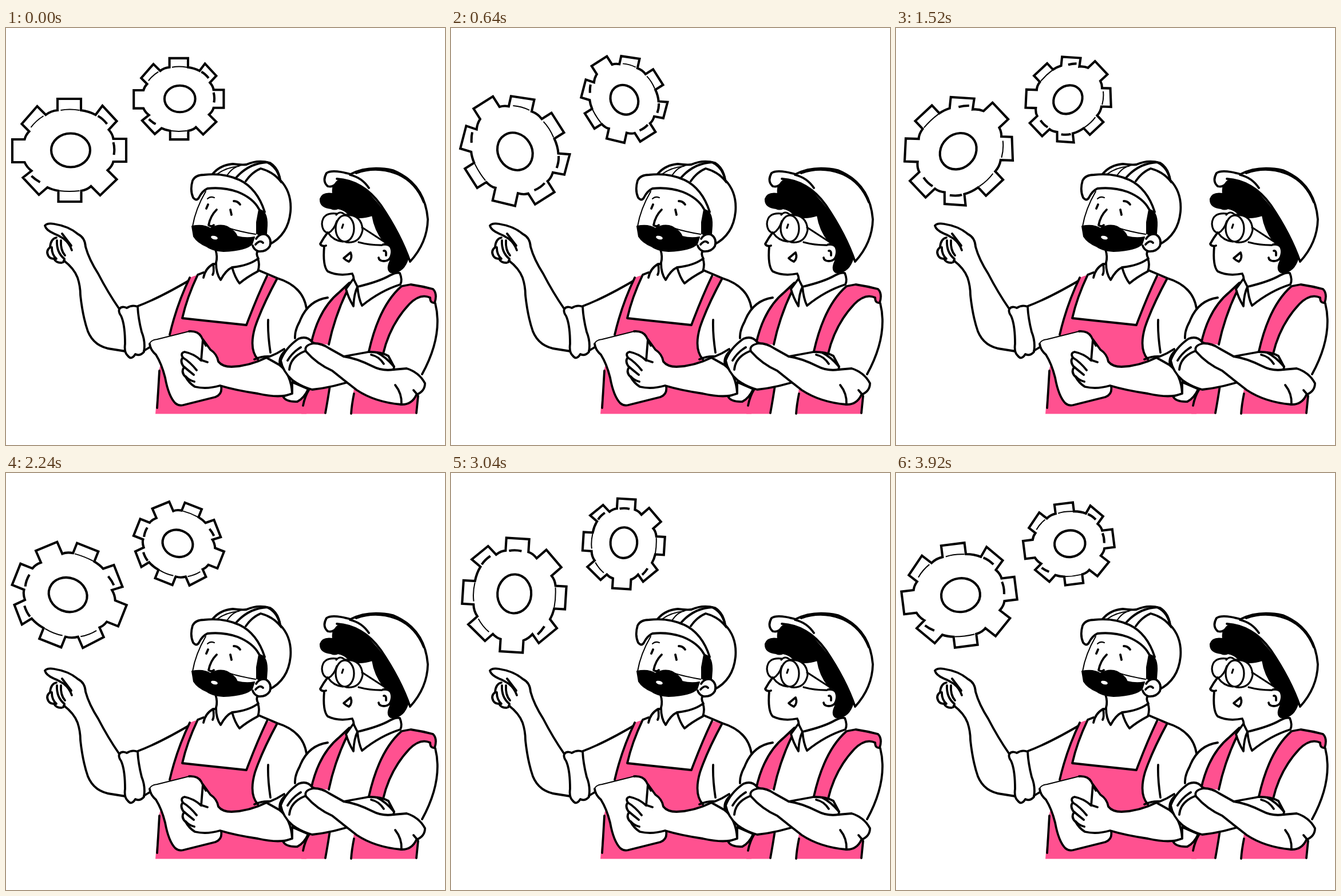
Animation, 767 px wide and 730 px high, one loop 4000 ms. Source, as an HTML page:

```html
<!DOCTYPE html>
<html lang="en">
<head>
<meta charset="utf-8">
<title>Engineers and gears</title>
<style>
  html, body { margin: 0; width: 100%; height: 100%; overflow: hidden; background: #fff; }
  svg { display: block; width: 767px; height: 730px; }
  .line { fill: none; stroke: #000; stroke-width: 3.8; stroke-linecap: round; stroke-linejoin: round; }
  .thin { stroke-width: 2; }
  .white { fill: #fff; }
  .black { fill: #000; stroke-width: 2; }
  .pink { fill: #ff5190; stroke: none; }
  .gear * { vector-effect: non-scaling-stroke; }
  .gear { stroke-width: 4.1; stroke-linejoin: miter; stroke-linecap: butt; }
</style>
</head>
<body>
<svg viewBox="0 0 767 730">
  <defs>
    <g id="gear" class="line gear">
      <path d="M-20.5-70V-90H20.5V-70Q35-68 46-62L58-78 83-51 69-36Q76-28 77-20H99.5V20H77Q75 28 67 35L83 51 54 79 38 63Q32 69 21 71V90H-19V71Q-30 69-38 65L-53 78-81 48-66 36Q-74 30-78 21H-99.5V-19H-78Q-76-27-70-33L-83-46-56-77-41-62Q-32-69-20.5-70Z"/>
      <ellipse cx="2.5" rx="34" ry="29.5"/>
      <path d="M77-14Q80-4 78 8M50-60Q58-56 66-46M-66 45Q-60 51-51 56"/>
      <path class="thin" d="M-15-70Q0-73 18-70M-17 71Q0 73 18 71M-67-40Q-58-52-45-60"/>
    </g>
  </defs>

  <g class="spin" data-x="110.5" data-y="214" data-scale="1"><use href="#gear"/></g>
  <g class="spin" data-x="301.8" data-y="124" data-scale=".79"><use href="#gear"/></g>

  <g class="line">
    <!-- pointing arm -->
    <path d="M115 389Q111 377 101 369Q92 363 84 360Q70 354 68 346Q72 341 84 343Q110 347 126 361Q138 367 139 383Q145 405 161 430Q178 463 198 492"/>
    <path d="M98 360L114 381M88 367Q78 369 77 384Q69 390 74 399Q77 404 84 404Q87 411 97 411Q103 410 102 404M89 372Q88 393 102 404M80 384Q80 397 88 404M96 372Q95 389 103 398"/>
    <path d="M101 407Q119 421 125 437Q130 452 130 468Q134 505 143 531Q154 558 184 562L209 566"/>
    <path class="white" d="M198 492Q202 486 211 490Q221 484 230 488Q231 508 237 532Q244 549 241 567Q234 575 226 571Q219 582 213 574Q206 568 208 553Q208 519 201 504Q196 497 198 492Z"/>
    <path d="M230 487Q270 472 330 436M241 565L254 557"/>

    <!-- first worker: dungarees -->
    <path class="pink" d="M321 437L335 432Q316 472 308 508L420 520Q438 472 456 434L474 438Q447 488 435 524Q424 560 440 580L470 600 530 640 525 675.5H261L268 596 286 540Q298 480 321 437Z"/>
    <path d="M335 432Q316 472 308 508L420 520Q438 472 456 434M321 437Q298 485 286 537M474 438Q447 488 435 524Q424 562 440 580M268 600Q266 635 264 665M335 432L345 428M441 424L474 438Q519 452 525 491M458 511Q457 535 462 568"/>

    <!-- tablet and holding arm -->
    <path class="white" stroke="none" d="M251 553Q254 546 264 545L320 531Q335 530 341 540L376 628Q378 641 366 646L310 660Q302 662 296 657Q284 645 278 612Q272 588 262 572Q252 563 251 553Z"/>
    <path class="white" d="M344 545L357 563Q369 571 371 584Q378 593 394 593Q425 592 455 577L478 590Q498 606 500 640Q480 649 440 640Q400 634 374 626Q350 633 330 628Q320 622 314 611Q305 603 311 594Q303 583 309 577Q304 569 312 567Q328 570 341 582Z"/>
    <path d="M309 577Q322 585 333 599M311 593Q319 600 328 607M314 610Q320 617 329 619M340 581L352 585M376 628Q378 641 366 646L310 660Q302 662 296 657Q284 645 278 612Q272 588 262 572Q252 563 251 553M320 531Q335 530 341 540L349 556"/>
    <path class="thin" d="M251 552Q254 546 264 545L320 531"/>
    <path d="M434 580Q448 574 461 575Q474 570 486 562M479 591Q475 577 488 565"/>

    <!-- first worker: neck and collar -->
    <path d="M366 388Q370 400 367 411M440 390Q436 395 441 404"/>
    <path class="white" d="M345 437Q348 421 362 413Q366 414 367 411Q367 430 375 441Q384 424 395 419Q400 437 408 447Q421 436 440 426Q444 413 440 404Q424 416 395 419M362 413Q364 428 361 432"/>

    <!-- first worker: head -->
    <path class="white" d="M360 257Q373 240 396 238Q412 240 420 239Q440 230 461 236Q476 245 479 266Q500 288 497 322Q493 362 460 379"/>
    <path class="white" stroke="none" d="M349 286Q331 317 326 347L366 388H432L446 330 430 290Z"/>
    <path class="thin" d="M349 286Q331 317 326 347"/>
    <path class="white" d="M327 297Q321 284 326 267Q331 257 346 257Q380 253 408 266Q439 281 452 322Q447 324 442 317Q432 298 405 287Q380 278 352 281Q343 285 337 297Q333 304 327 297Z"/>
    <path class="thin" d="M387 257Q398 240 420 239M367 257Q384 244 407 242"/>
    <path d="M402 262Q424 237 456 235Q474 243 479 266M419 268Q430 252 445 246Q468 252 481 270"/>
    <path class="black" d="M442 318Q457 320 456 346L455 360Q444 364 438 360L438 340Z"/>
    <path class="black" d="M325 347Q345 343 357 351Q372 342 387 348Q401 356 404 365Q420 369 434 366L430 378Q420 389 380 391Q360 390 350 382Q335 376 328 365Z"/>
    <path class="thin" d="M385 349Q410 357 436 361"/>
    <ellipse cx="364" cy="367" rx="6" ry="3" fill="#fff" stroke="none" transform="rotate(15 364 367)"/>
    <path class="white" d="M437 369Q444 358 455 362Q465 369 461 382Q455 392 441 391Q433 388 431 381"/>
    <path d="M436 379Q444 370 449 376M353 309L350 316M392 318L394 327M398 303Q405 303 409 309M368 318Q357 329 354 345Q359 349 363 345"/>
    <path class="thin" d="M352 299Q357 294 364 297"/>

    <!-- second worker: dungarees and shirt -->
    <path class="white" d="M484 645Q489 655 509 654Q521 648 528 632L500 620V640Z"/>
    <path class="pink" d="M529 630L568 622 559 675.5H516ZM608 630L690 655 720 642 718 675.5H602Z"/>
    <path d="M566 626Q562 652 558 674M608 640Q604 660 603 675M720 644L717 674M530 632Q522 645 519 661"/>
    <path class="pink" d="M600 446L583 462Q546 492 533 553L564 554Q574 506 596 460Z"/>
    <path d="M600 446L583 462Q546 492 533 553M596 460Q574 506 564 554M562 472Q527 477 513 514Q504 530 505 543"/>
    <path class="pink" d="M691 452L707 449Q727 452 746 457Q754 465 749 481Q741 482 741 472Q724 464 705 483Q671 519 659 570L634 566Q652 486 691 452Z"/>
    <path d="M634 566Q652 486 691 452L707 449Q727 452 746 457Q754 465 749 481Q741 482 741 472Q724 464 705 483Q671 519 659 570M750 482Q764 538 727 606"/>

    <!-- second worker: crossed arms -->
    <path class="white" d="M480 582Q488 560 511 544Q526 538 535 550L600 580 612 615Q573 629 535 633Q516 628 500 616Q484 602 480 582Z"/>
    <path d="M492 582Q501 567 515 559M495 598Q497 575 524 565"/>
    <path class="white" d="M524 566Q520 555 538 552Q552 552 565 561L590 575Q612 571 634 567Q656 567 668 574L678 593 677 598 700 596Q722 603 732 622Q732 636 717 642Q709 660 690 659Q645 655 613 634Q591 617 570 600Q543 588 524 566Z"/>
    <path d="M590 575Q612 578 640 592Q657 601 677 598M638 572Q652 575 660 588M648 568Q664 576 678 593M680 625Q692 640 691 659M718 641L712 634"/>

    <!-- second worker: neck and collar -->
    <path d="M605 430Q609 438 607 447"/>
    <path class="white" d="M594 457Q598 472 607 487Q608 465 614 453L607 439ZM614 453Q652 444 671 433Q682 427 688 429Q693 441 689 449Q654 460 622 486Q616 474 614 453Z"/>

    <!-- second worker: head -->
    <path class="white" stroke="none" d="M562 320L549 378 556 390Q553 418 562 426Q580 435 605 431L670 420 650 330Z"/>
    <path class="black" d="M578 268Q610 255 640 297Q680 340 703 402Q695 430 672 428Q664 423 671 408Q675 390 668 382L660 374Q644 354 640 328Q616 336 600 328Q592 318 580 316Q574 319 568 316Q548 314 549 299Q553 287 571 290Q569 276 578 268Z"/>
    <path class="white" d="M578 270Q572 280 562 277Q552 268 560 254Q567 249 585 252Q596 254 602 256Q633 240 676 249Q732 272 737 335Q736 376 706 409Q690 362 655 310Q624 267 578 264"/>
    <path d="M601 257Q622 262 634 280M612 254Q648 241 685 256Q716 270 730 305"/>
    <path d="M562 358Q555 367 549 378Q551 383 559 381M556 382Q553 416 562 426Q580 435 605 430"/>
    <path class="white" stroke-width="3.2" d="M592 327Q622 326 623 354Q618 378 594 375"/>
    <ellipse class="white" stroke-width="3.2" cx="592" cy="351" rx="16" ry="23"/>
    <path stroke-width="3.2" d="M578 325Q553 322 552 343Q553 357 563 359Q573 354 578 338M563 359Q572 372 588 374M577 327Q584 319 592 327M622 349L662 375M616 375Q638 381 662 380M589 344L587 350"/>
    <path class="white" d="M659 379Q674 377 674 392Q673 408 660 408Q652 408 651 402"/>
    <path d="M660 390Q665 389 664 398M590 403L602 393Q606 403 599 409Q594 407 590 403Z"/>
  </g>
</svg>
<script>
  const LOOP = 4000, STEP = 80;
  const gears = document.querySelectorAll('.spin');

  function draw(now) {
    const time = Math.floor((now % LOOP) / STEP) * STEP;
    const angle = 360 * time / LOOP;
    for (const gear of gears) {
      const { x, y, scale } = gear.dataset;
      gear.setAttribute('transform', `translate(${x} ${y}) rotate(${angle}) scale(${scale})`);
    }
  }

  let start;
  function tick(now) {
    start ??= now;
    draw(now - start);
    requestAnimationFrame(tick);
  }
  draw(0);
  requestAnimationFrame(tick);
</script>
</body>
</html>
```
